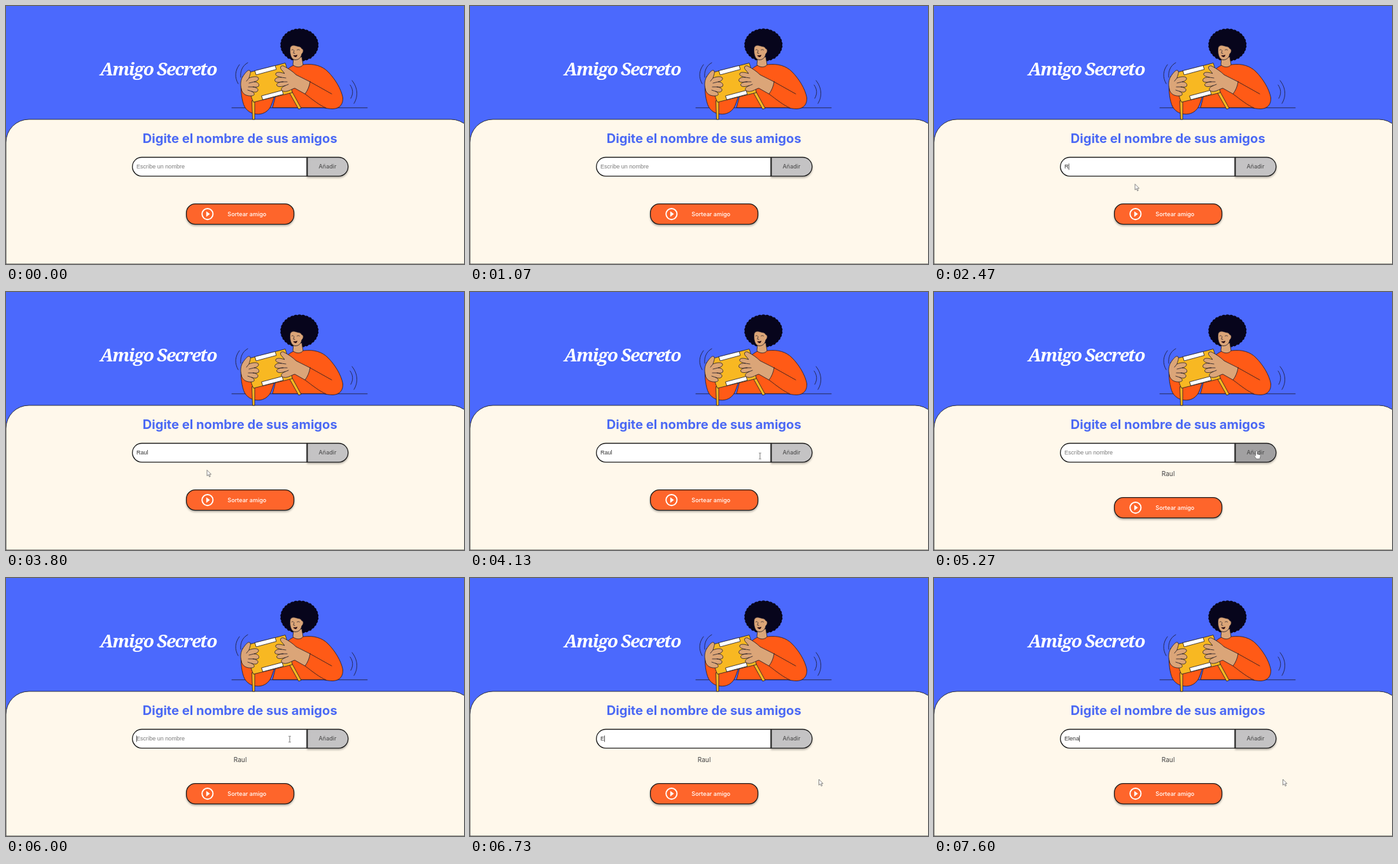
Recreate the animation shown at these times as an HTML page. Size 720x405 px, loop 8000 ms.

```html
<!DOCTYPE html>
<html lang="es">
<head>
<meta charset="utf-8">
<title>Amigo Secreto</title>
<style>
  html, body { margin: 0; width: 100%; height: 100%; overflow: hidden; background: #4b69fd; }
  svg { display: block; width: 100vw; height: 100vh; }
  text { font-family: Inter, sans-serif; font-size: 9.07px; fill: #444; white-space: pre; }
  .title { font: italic 700 28px "Noto Serif", serif; letter-spacing: -1.6px; fill: #fff; }
  .heading { font-size: 20.15px; font-weight: 700; fill: #4b69f4; }
  .field { font-family: "Liberation Sans", Arial, sans-serif; }
  .go { font-weight: 500; fill: #fff; }
  .mid { text-anchor: middle; }
  .frame { stroke: #1a1a1a; stroke-width: 1.3; }
  .shade { filter: drop-shadow(0 2.2px 1.6px rgba(0, 0, 0, .3)); }
  .art { stroke: #1c1826; stroke-width: .8; stroke-linejoin: round; stroke-linecap: round; }
  .cloth { fill: #ff5a16; }
  .skin { fill: #dba578; }
  .gold { fill: #f8b822; }
  .paper { fill: #fff; }
  .line { fill: none; }
  .cursor { stroke: #666; stroke-width: .8; stroke-linejoin: round; fill: #fff; }
</style>
</head>
<body>
<svg viewBox="0 0 720 405">
  <rect width="720" height="405" fill="#4b69fd"/>
  <text class="title mid" x="239.300" y="108.800">Amigo Secreto</text>

  <path d="M0 405V214A36 36 0 0 1 36 178H699.500A36 36 0 0 1 735.500 214V405Z" fill="#fff8eb" stroke="#222" stroke-width=".9"/>

  <g class="art">
    <path class="line" d="M355 159.800H568"/>
    <!-- far arm -->
    <path class="cloth" d="M370 118C368 132 371 150 375 158C380 167 390 171 400 169.500C409 168 415 162 418 153L424 136Z"/>
    <!-- torso and near arm -->
    <path class="cloth" d="M444 98C448 95 451 93 455 92H468C484 90 497 94 506 103C517 114 527 130 529.500 144C530 154 525 161 514 161.500C508 161.500 503 160.500 499 159.600H419L424 140Z"/>
    <path class="line" d="M478 119L512 138M470 138C482 147 493 156 503 160"/>
    <!-- head -->
    <path id="hair" fill="#07051c" stroke="none"/>
    <path class="skin" d="M452 82L451 92C455 97 464 97 467 92L465 80Z"/>
    <path class="skin" d="M446.500 67C447 62 451 61 456 62.500C460 64 463 63 465 67C468 67 468 73 465 75C464 81 460 85 454 84.500C448 83.500 446 75 446.500 67Z"/>
    <path class="line" stroke-width=".7" d="M449 69Q450.500 67.500 452 69M457.500 69Q459.500 67.500 461.500 69M453 70L451.800 74L454 74.500"/>
    <path d="M451.500 77.300Q455 77.800 458 76.500Q457.500 80.300 455 80.300Q452 80 451.500 77.300Z" fill="#2a0d14" stroke="none"/>
    <!-- table box -->
    <path class="gold" d="M386.500 149L387.500 178H391L391 148ZM446 137L460 162L464 160.500L450 135Z"/>
    <path class="gold" d="M379 105L439 89.500C443 101 448 121 450 136L389 151C383 139 380 121 379 105Z"/>
    <path class="paper" d="M391.500 101.500L423 93.500L425 99.500L393.500 108ZM402 141L434 132.500L436 138.500L404 147Z"/>
    <!-- hands -->
    <path class="skin" d="M372 111C376 105 380 100 383 101C386 103 383 109 382 113C387 111 393 110 396 112C399 115 395 118 390 119C396 119 399 123 397 126C395 128 391 127 388 127C395 128 398 131 395 134C393 136 389 135 386 134C391 136 392 140 387 141C378 142 371 138 370 130C368 123 369 116 372 111Z"/>
    <path class="line" d="M382 113L378 118M390 119L382 121M388 127L381 127M386 134L380 132"/>
    <path class="skin" d="M478 119L456 108C451 103 444 98 436 94C431 93 430 98 434 101L438 106C432 104 426 103 424 106C423 110 429 111 433 112C427 111 421 114 423 118C426 121 431 119 436 119C429 119 424 122 426 125C429 128 435 126 439 125C434 127 431 130 434 133C441 137 449 130 454 129L470 138C474 133 477 126 478 119Z"/>
    <path class="line" d="M433 112L440 113M436 119L442 119M439 125L444 123"/>
    <!-- shaking -->
    <path class="line" d="M367 92C360 101 359 112 365 122M380 89C371 94 368 103 369 112M541 124C546 131 546 138 542 145M544 117C553 128 554 142 547 153"/>
  </g>

  <text class="heading mid" x="367.700" y="215">Digite el nombre de sus amigos</text>

  <path class="frame" fill="#fff" d="M473 237.500H213.500A14.800 14.800 0 0 0 213.500 267.100H473Z"/>
  <g class="shade">
    <path id="add" class="frame" d="M473.800 237.500H523A14.800 14.800 0 0 1 523 267.100H473.800Z"/>
  </g>
  <text class="mid" x="505.500" y="255.400">Añadir</text>
  <text id="field" class="field" x="205" y="255.200"></text>
  <path id="caret" d="M0 247.300V257.300" stroke="#222" stroke-width=".8"/>
  <text id="friend" class="mid" x="368" y="288.600" style="font-size:10.2px">Raul</text>

  <g id="draw">
    <rect class="frame shade" x="283.600" y="310.600" width="169" height="32" rx="14" fill="#fe652b"/>
    <circle cx="316.800" cy="326.600" r="8.600" fill="none" stroke="#fff" stroke-width="1.900"/>
    <path d="M314.800 322.300L320.600 326.600L314.800 330.900Z" fill="#fff"/>
    <text class="go" x="348.300" y="330.200">Sortear amigo</text>
  </g>

  <g id="pointer">
    <path id="arrow" class="cursor" d="M0 0V9.200L2.200 7.200L3.700 10.700L5.200 10L3.700 6.700H6.500Z"/>
    <path id="beam" d="M-1.800 -4.600H-.5L0 -4.200L.5 -4.600H1.800M0 -4.200V4.200M-1.800 4.600H-.5L0 4.200L.5 4.600H1.800" fill="none" stroke="#555" stroke-width=".8"/>
    <path id="hand" class="cursor" d="M-.2 .2C.8 -.5 1.600 0 1.600 1V5L5.400 5.800C6.500 6.100 6.900 6.800 6.700 8L5.700 12.500H.3L-2.800 8.200C-3 7 -1.800 6.700 -.8 7.700V1Z"/>
  </g>
</svg>
<script>
const LOOP = 8000, BLINK = 530;
const PLACEHOLDER = "Escribe un nombre";
const $ = id => document.getElementById(id);
const show = (id, on) => $(id).setAttribute("visibility", on ? "visible" : "hidden");

const ADD_TIME = 4800;
// Each visit to the field: focus, blur, word and key times
const visits = [
  { focus: 1600, blur: 4530, word: "Raul", keys: [2470, 2730, 2930, 3270] },
  { focus: 5940, blur: LOOP, word: "Elena", keys: [6730, 6870, 7130, 7400, 7600] }
];
// Pointer stops: time, x, y
const path = [
  [1270, 318, 253], [1400, 308, 252], [1600, 310, 253], [1730, 316, 279.5],
  [3800, 316, 279.5], [4300, 506.500, 249.500], [5270, 506.500, 249.500],
  [5880, 446, 253], [6070, 446, 253], [6200, 548.500, 316]
];

function scallops(cx, cy, rx, ry, count) {
  let d = "";
  for (let i = 0; i <= count; i++) {
    const a = i / count * 2 * Math.PI;
    const x = cx + rx * Math.cos(a), y = cy + ry * Math.sin(a);
    d += (i ? "A4.200 4.200 0 0 1 " : "M") + x.toFixed(2) + " " + y.toFixed(2);
  }
  return d + "Z";
}

function pointerAt(t) {
  if (t < path[0][0]) return null;
  const i = path.findIndex(p => p[0] > t);
  if (i < 0) return path[path.length - 1].slice(1);
  const [t0, x0, y0] = path[i - 1], [t1, x1, y1] = path[i];
  const u = (t - t0) / (t1 - t0), k = u * u * (3 - 2 * u);
  return [x0 + (x1 - x0) * k, y0 + (y1 - y0) * k];
}

function pointerKind([x, y]) {
  if (y < 237 || y > 268 || x < 198 || x > 538) return "arrow";
  return x < 473 ? "beam" : "hand";
}

function drawField(t) {
  const visit = t < ADD_TIME ? visits[0] : visits[1];
  const typed = visit.keys.filter(k => k <= t);
  const text = visit.word.slice(0, typed.length);
  const field = $("field");
  field.textContent = text || PLACEHOLDER;
  field.style.fill = text ? "#333" : "#7b7b7b";

  const focused = t >= visit.focus && t < visit.blur;
  const since = t - (typed.length ? typed[typed.length - 1] : visit.focus);
  show("caret", focused && Math.floor(since / BLINK) % 2 === 0);
  const end = text ? field.getComputedTextLength() + .5 : .3;
  $("caret").setAttribute("transform", `translate(${205 + end} 0)`);
}

function render(t) {
  drawField(t);
  const added = t >= ADD_TIME;
  show("friend", added);
  $("draw").setAttribute("transform", `translate(0 ${added ? 12 : 0})`);

  const at = pointerAt(t), kind = at && pointerKind(at);
  for (const id of ["arrow", "beam", "hand"]) show(id, id === kind);
  if (at) $("pointer").setAttribute("transform", `translate(${at})`);
  $("add").setAttribute("fill", kind === "hand" ? "#a1a0a1" : "#c4c3c4");
}

function tick() {
  render(performance.now() % LOOP);
  requestAnimationFrame(tick);
}

$("hair").setAttribute("d", scallops(461.3, 61.2, 29.3, 24.8, 30));
tick();
</script>
</body>
</html>
```
